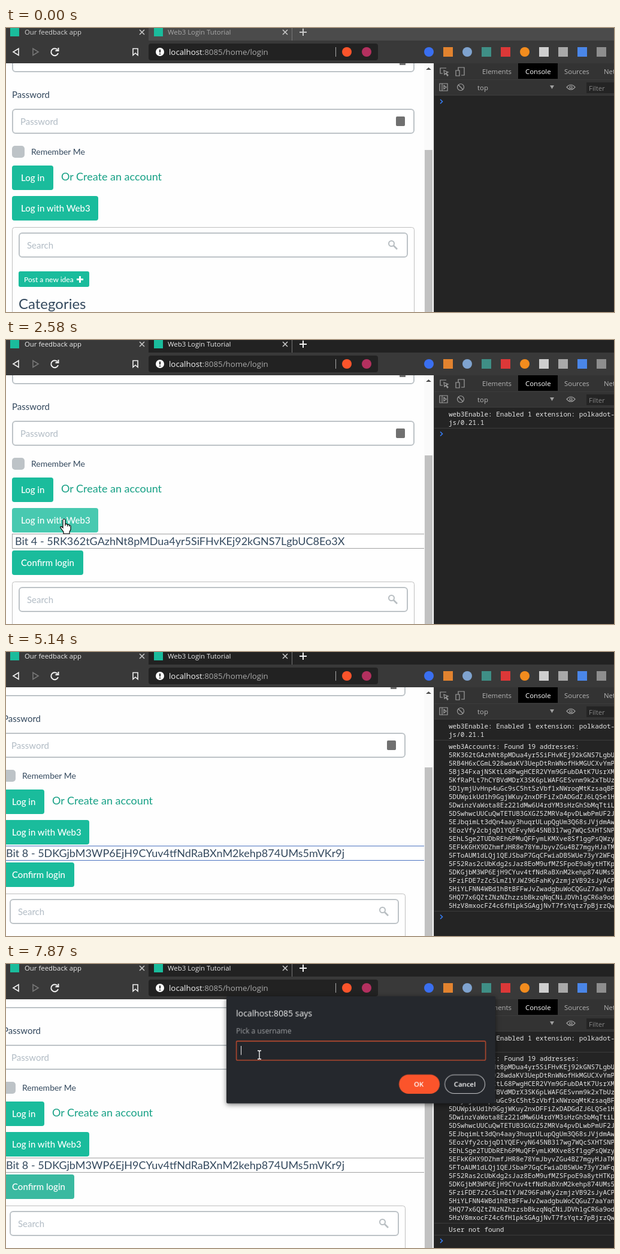
An HTML page for the animation above (8000 ms loop, 1015 px wide and 475 px high).

```html
<!DOCTYPE html>
<html lang="en">
<head>
<meta charset="utf-8">
<title>Web3 login</title>
<style>
html, body { margin: 0; width: 100%; height: 100%; overflow: hidden; background: #fff; }
svg { display: block; width: 1015px; height: 475px; }
text { white-space: pre; }

.ui { font: 11.4px "Open Sans", "Noto Sans", sans-serif; fill: #e0e0e0; }
.page { font: 15px Lato, sans-serif; fill: #34495e; }
.mono { font: 500 11px "Noto Sans Mono", "DejaVu Sans Mono", monospace; fill: #e6e6e6; }
.big { font-size: 18px; }
.hint { fill: #b2bcc5; }
.white { fill: #fff; font-weight: 500; }
.teal { fill: #1abc9c; }
.field { fill: #fff; stroke: #bdc3c7; stroke-width: 2; }
.line { fill: none; stroke: #c8c8c8; stroke-width: 1.6; }
.thin { fill: none; stroke: #a0a0a0; stroke-width: 1.2; }
.rule { fill: none; stroke: #3c3c3c; }

/* Every part shares one 8 s clock; percentages are ms / 80. */
.a { animation: 8s step-end infinite; }
.hidden { opacity: 0; }

.strip { fill: #4b4b4b; animation-name: strip; }
.title1 { fill: #d2d2d2; animation-name: title; }
.title2 { fill: #a8a8a8; animation-name: title; }
.plus { stroke: #c8c8c8; stroke-width: 2; animation-name: plus; }
@keyframes strip { 6.3%, 100% { fill: #222; } }
@keyframes title { 6.3%, 100% { fill: #ececec; } }
@keyframes plus { 6.3%, 100% { stroke: #f2f2f2; } }

.scrolled { animation-name: scrolled; }
@keyframes scrolled { 42.8%, 100% { transform: translateX(-15px); } }
.panel { animation-name: panel; }
@keyframes panel { 29.3%, 100% { transform: translateY(71px); } }
.thumb { animation-name: thumb; }
@keyframes thumb { 29.3%, 100% { transform: translateY(-11px); } }

.enabled { animation-name: enabled; }
@keyframes enabled { 29.3%, 100% { opacity: 1; } }
.accounts { animation-name: accounts; }
@keyframes accounts { 33.2%, 100% { opacity: 1; } }
.missing { animation-name: missing; }
@keyframes missing { 81%, 100% { opacity: 1; } }
.prompt { animation-name: prompt; }
@keyframes prompt {
  29.3% { transform: translateY(34px); }
  33.2% { transform: translateY(320px); }
  81%, 100% { transform: translateY(340px); }
}

.web3 { fill: #1abc9c; animation-name: web3; }
@keyframes web3 { 27.3% { fill: #48c9b0; } 46.7%, 100% { fill: #1abc9c; } }
.confirm { fill: #1abc9c; animation-name: confirm; }
@keyframes confirm { 75.9%, 100% { fill: #3ab9a0; } }
.select { fill: #fff; stroke: #a0a0a0; animation-name: select; }
@keyframes select { 42.8% { stroke: #4a73c0; } 77.3%, 100% { stroke: #a0a0a0; } }
.before { animation-name: before; }
@keyframes before { 64.2%, 100% { opacity: 0; } }
.after { animation-name: after; }
@keyframes after { 64.2%, 100% { opacity: 1; } }

.list { animation-name: list; }
@keyframes list { 42.8% { opacity: 1; } 64.2%, 100% { opacity: 0; } }
.mark { fill: #1e90ff; animation-name: mark; }
@keyframes mark {
  49.6% { transform: translateY(32px); }
  50.6% { transform: translateY(64px); }
  51.6%, 100% { transform: translateY(64px); opacity: 0; }
}
.row1 { fill: #fff; animation-name: row1; }
.row2 { animation-name: row2; }
.row3 { animation-name: row3; }
@keyframes row1 { 49.6%, 100% { fill: #34495e; } }
@keyframes row2 { 49.6% { fill: #fff; } 50.6%, 100% { fill: #34495e; } }
@keyframes row3 { 50.6% { fill: #fff; } 51.6%, 100% { fill: #34495e; } }

.dialog {
  filter: drop-shadow(0 2px 4px #0008);
  transform-origin: 592px 143px;
  animation-name: dialog;
}
@keyframes dialog {
  82% { opacity: .32; transform: translateY(-17px) scale(1.012); }
  82.95% { opacity: .72; transform: translateY(-9.5px) scale(1.006); }
  83.85% { opacity: .93; transform: translateY(-3px) scale(1.002); }
  84.8%, 100% { opacity: 1; transform: none; }
}
.caret { animation-name: caret; }
@keyframes caret { 90.5% { opacity: 0; } 96.8%, 100% { opacity: 1; } }

.pointer { animation: move 8s linear infinite; }
@keyframes move {
  0%, 16% { transform: translate(366px, 476px); }
  17% { transform: translate(364px, 460px); }
  21.5% { transform: translate(120px, 368px); }
  24% { transform: translate(30px, 334px); }
  26.5%, 39% { transform: translate(97px, 300px); }
  41.8%, 49.5% { transform: translate(159px, 346px); }
  49.6% { transform: translate(165px, 388px); }
  50.6%, 51.6% { transform: translate(174px, 429px); }
  51.7%, 72.8% { transform: translate(150px, 470px); }
  76.5%, 88.7% { transform: translate(76px, 377px); }
  92.5% { transform: translate(225px, 262px); }
  95.5% { transform: translate(405px, 132px); }
  97.3%, 100% { transform: translate(423px, 152px); }
}
.arrow { animation-name: arrow; }
@keyframes arrow {
  16% { opacity: 1; } 27.3% { opacity: 0; }
  40% { opacity: 1; } 51.6% { opacity: 0; }
  72.8% { opacity: 1; } 75.9% { opacity: 0; }
  90% { opacity: 1; } 95%, 100% { opacity: 0; }
}
.hand { animation-name: hand; }
@keyframes hand {
  27.3% { opacity: 1; } 40% { opacity: 0; }
  75.9% { opacity: 1; } 90%, 100% { opacity: 0; }
}
.ibeam { animation-name: ibeam; }
@keyframes ibeam { 95%, 100% { opacity: 1; } }
.click { fill: #f2cf35; animation-name: click; }
@keyframes click {
  28.4% { opacity: .85; } 29.3% { opacity: 0; }
  41.8% { opacity: .85; } 44.8% { opacity: 0; }
  77.3% { opacity: .85; } 79.1%, 100% { opacity: 0; }
}
</style>
</head>
<body>
<svg viewBox="0 0 1015 475">
  <defs><clipPath id="view"><path d="M0 59H698V475H0z"/></clipPath></defs>

  <!-- page -->
  <rect width="1015" height="475" fill="#fefefe"/>
  <g clip-path="url(#view)">
    <g class="page a scrolled">
      <rect class="field" x="11" y="32" width="670" height="41" rx="5"/>
      <path d="M657 59h10v3h-10z" fill="#707070"/>
      <text x="10" y="117">Password</text>
      <rect class="field" x="11" y="136" width="670" height="40" rx="5"/>
      <text class="hint" x="24" y="162">Password</text>
      <rect x="651" y="148" width="15" height="16" rx="2" fill="#707070"/>
      <rect x="10" y="197" width="21" height="20" rx="5" fill="#bdc3c7"/>
      <text x="42" y="212" font-size="14">Remember Me</text>
      <rect class="teal" x="10" y="230" width="69" height="41" rx="4"/>
      <text class="white" x="25" y="256">Log in</text>
      <text class="big" x="92" y="255" fill="#16a085">Or Create an account</text>
      <rect class="a web3" x="10" y="281" width="144" height="41" rx="4"/>
      <text class="white" x="25" y="307">Log in with Web3</text>

      <g class="a hidden enabled">
        <rect class="a select" x="10.5" y="324.5" width="900" height="24"/>
        <text class="big a before" x="15" y="343" data-account="0"></text>
        <text class="big a hidden after" x="15" y="343" data-account="4"></text>
        <rect class="a confirm" x="10" y="352" width="119" height="41" rx="4"/>
        <text class="white" x="25" y="378">Confirm login</text>
      </g>

      <g class="a panel">
        <rect x="10.5" y="333.5" width="671" height="200" rx="4" fill="#fefefe" stroke="#bfbfbf"/>
        <rect class="field" x="22" y="343" width="648" height="40" rx="5"/>
        <text class="hint" x="35" y="369">Search</text>
        <g fill="none" stroke="#b8bec2" stroke-width="2">
          <circle cx="643.5" cy="360.5" r="4.5"/><path d="M647 364l6 6" stroke-width="2.6"/>
        </g>
        <rect class="teal" x="21" y="407" width="118" height="26" rx="3"/>
        <text class="white" x="30" y="425" font-size="12">Post a new idea</text>
        <path d="M118 420.5h11M123.5 415v11" stroke="#fff" stroke-width="3"/>
        <text x="21" y="470" font-size="24">Categories</text>
      </g>
    </g>
  </g>
  <path d="M698 59h16v416h-16z" fill="#fafafa"/>
  <path d="M701 70l4.5-4 4.5 4z" fill="#505050"/>
  <rect class="a thumb" x="699" y="204" width="13" height="300" fill="#c1c1c1"/>

  <!-- developer tools -->
  <path d="M714 59h301v416H714z" fill="#242424"/>
  <path d="M714 59h301v53H714z" fill="#333"/>
  <path d="M855 59h66v26h-66z" fill="#000"/>
  <path class="rule" d="M714 86.5h301M714 112.5h301M714.5 59v416"/>
  <g class="thin">
    <path d="M735 67h-10v9h4M731 71l7 3-3 1 3 4-1 1-3-4-2 2z"/>
    <path d="M755 71v-5h10v13h-5M751 71h6v9h-6z"/>
    <path d="M724 93h13v12h-13zM728 93v12M731 96l4 3-4 3z"/>
    <circle cx="759" cy="99" r="5.5"/><path d="M755 95l8 8"/>
    <path d="M936 99q7-8 14 0-7 8-14 0z"/><circle cx="943" cy="99" r="2"/>
  </g>
  <path d="M908 96h7l-3.5 6z" fill="#a0a0a0"/>
  <path d="M969 91h46v18h-46z" fill="#242424"/>
  <g class="ui" style="fill: #b4b4b4">
    <text x="795" y="77">Elements</text>
    <text x="867" y="77" fill="#fff">Console</text>
    <text x="932" y="77">Sources</text>
    <text x="998" y="77">Network</text>
    <text x="787" y="104">top</text>
    <text x="973" y="105" fill="#858585">Filter</text>
  </g>
  <g class="mono">
    <g class="a hidden enabled">
      <text x="739" y="128">web3Enable: Enabled 1 extension: polkadot-</text>
      <text x="739" y="142">js/0.21.1</text>
      <path class="rule" d="M715 147.5h300"/>
    </g>
    <g class="a hidden accounts">
      <text x="739" y="162">web3Accounts: Found 19 addresses:</text>
      <g id="addresses"></g>
      <path class="rule" d="M715 433.5h300"/>
    </g>
    <g class="a hidden missing">
      <text x="739" y="448">User not found</text>
      <path class="rule" d="M715 453.5h300"/>
    </g>
  </g>
  <path class="a prompt" d="M725 119.5l3.5 3.5-3.5 3.5" fill="none" stroke="#367cf1" stroke-width="1.7"/>

  <!-- browser bars -->
  <path class="a strip" d="M0 0h1015v22H0z"/>
  <path d="M0 0h238v22H0zM0 21h1015v38H0z" fill="#393939"/>
  <path class="teal" d="M7 0h15v14H7zM247 0h15v14h-15z"/>
  <g class="ui">
    <text class="a title1" x="31" y="11">Our feedback app</text>
    <text class="a title2" x="270" y="11">Web3 Login Tutorial</text>
  </g>
  <path class="line" d="M223 3l8 8m0-8l-8 8M462 3l8 8m0-8l-8 8"/>
  <path class="a plus" d="M490 7h12M496 1v12"/>
  <path d="M477.5 0v21" stroke="#777"/>
  <g class="line" style="stroke: #f0f0f0">
    <path d="M21 34.5v11L12 40z"/>
    <path d="M45 34.5v11l9-5.5z" stroke="#777"/>
    <path d="M86 36.5a6 6 0 1 0 1 5.5M87.5 33v5h-5" stroke-width="2"/>
    <path d="M212 34.5h8v11l-4-3.500-4 3.500z"/>
  </g>
  <rect x="238" y="26" width="383" height="28" rx="4" fill="#222"/>
  <circle cx="257" cy="40" r="7" fill="#fff"/>
  <path d="M257 36v5M257 42.5v2" stroke="#222" stroke-width="2"/>
  <text class="ui" x="272" y="45" style="font-size: 13.3px; fill: #aaa"><tspan fill="#f5f5f5">localhost</tspan>:8085/home/login</text>
  <path d="M550.5 32v16" stroke="#aaa"/>
  <circle cx="569" cy="40" r="8" fill="#fb542b"/>
  <circle cx="602" cy="40" r="8" fill="#b3305f"/>
  <g id="extensions"></g>

  <!-- option list -->
  <g class="page a hidden list">
    <path d="M0 349h715v126H0z" fill="#fff"/>
    <path d="M698 349h16v126h-16z" fill="#f1f1f1"/>
    <path d="M699 367h14v108h-14z" fill="#c1c1c1"/>
    <path d="M702 360l4.5-4 4.5 4z" fill="#a3a3a3"/>
    <path d="M0 349.5h715.5V475" fill="none" stroke="#9a9a9a"/>
    <rect class="a mark" y="350" width="698" height="32"/>
    <g class="big">
      <text class="a row1" y="373" data-account="0"></text>
      <text class="a row2" y="405" data-account="1"></text>
      <text class="a row3" y="437" data-account="2"></text>
      <text y="469" data-account="3"></text>
    </g>
  </g>

  <!-- dialog -->
  <g class="ui a hidden dialog">
    <rect x="368" y="54" width="449" height="179" rx="2" fill="#25282d"/>
    <text x="384" y="88" font-size="14.1" fill="#f4f4f4">localhost:8085 says</text>
    <text x="384" y="116" font-size="12.1" fill="#9fa1a4">Pick a username</text>
    <rect x="384.5" y="129" width="416" height="32" rx="2" fill="#23262b" stroke="#b5492f" stroke-width="1.6"/>
    <path class="a caret" d="M392.5 137v15" stroke="#eee"/>
    <rect x="656" y="185" width="68" height="32" rx="16" fill="#fb542b"/>
    <rect x="732.5" y="185.5" width="67" height="31" rx="15.5" fill="none" stroke="#c9cacc"/>
    <g text-anchor="middle" font-weight="600" fill="#fff">
      <text x="689" y="205">OK</text>
      <text x="766" y="205">Cancel</text>
    </g>
  </g>

  <!-- pointer -->
  <g class="pointer">
    <circle class="a hidden click" cy="1" r="13"/>
    <path class="a hidden arrow" d="M0 0v16l3.700-3.500L6.300 18.500l2.500-1-2.500-6H11.500z" fill="#fff" stroke="#000"/>
    <g class="a hidden hand">
      <path d="M-2 1.500a2 2 0 0 1 4 0V8q3-1 3.500.8 2.500-.7 3 1 2.500-.3 2.500 2V17l-2 4v3H-1v-3l-5-7c-1-2 1.500-3 4 0z" fill="#fff" stroke="#000" stroke-width="1.2"/>
      <path d="M2 8v3M5.500 9v3M8.500 10v2" stroke="#000"/>
    </g>
    <path class="a hidden ibeam" d="M-3-7h2l1 1 1-1h2M0-6V6M-3 7h2l1-1 1 1h2" fill="none" stroke="#fff" stroke-width="1.3"/>
  </g>
</svg>
<script>
const accounts = [
  ["Bit 4", "5RK362tGAzhNt8pMDua4yr5SiFHvKEj92kGNS7LgbUC8Eo3X"],
  ["Vorama Experiment", "5RB4H6xCGmL928wdaKV3UepDtRnWNofHkMGUCXvYmPrsnbtf"],
  ["Bit 27", "5Bj34FxajNSKtL68PwgHCER2VYm9GFubDAtK7UsrXMND5y4H"],
  ["Bit 35", "5KfRaPLt7hCYBVdMDrX3SK6pLWAFGESvnm9k2xTbUzPrc8RL"],
  ["Bit 8", "5DKGjbM3WP6EjH9CYuv4tfNdRaBXnM2kehp874UMs5mVKr9j"],
];
for (const label of document.querySelectorAll("[data-account]"))
  label.textContent = accounts[label.dataset.account].join(" - ");

function add(parent, tag, attributes) {
  const node = document.createElementNS("http://www.w3.org/2000/svg", tag);
  for (const [name, value] of Object.entries(attributes)) node.setAttribute(name, value);
  return document.querySelector(parent).appendChild(node);
}

let seed = 91;
const random = () => (seed = seed * 16807 % 2147483647) / 2147483647;
const alphabet = "123456789ABCDEFGHJKLMNPQRSTUVWXYZabcdefghijkmnopqrstuvwxyz";
const randomText = length =>
  Array.from({ length }, () => alphabet[Math.floor(random() * alphabet.length)]).join("");

for (let i = 0; i < 19; i++) {
  const known = i < 4 ? accounts[i] : i === 14 ? accounts[4] : null;
  add("#addresses", "text", { x: 739, y: 176 + i * 14 }).textContent =
    known ? known[1] : "5" + "CDEFH"[Math.floor(i / 4)] + randomText(46);
}

// Extension buttons: colour and corner radius.
[["#3a6ff0", 8], ["#e2832f", 0], ["#7fa3cf", 8], ["#3f8f86", 0], ["#dc3838", 0],
 ["#f28c1e", 8], ["#cfcfcf", 0], ["#a9a9a9", 0], ["#4a86e8", 0], ["#8e8e8e", 0]]
  .forEach(([fill, rx], i) => add("#extensions", "rect", { x: 698 + i * 32, y: 32, width: 16, height: 16, rx, fill }));
</script>
</body>
</html>
```
